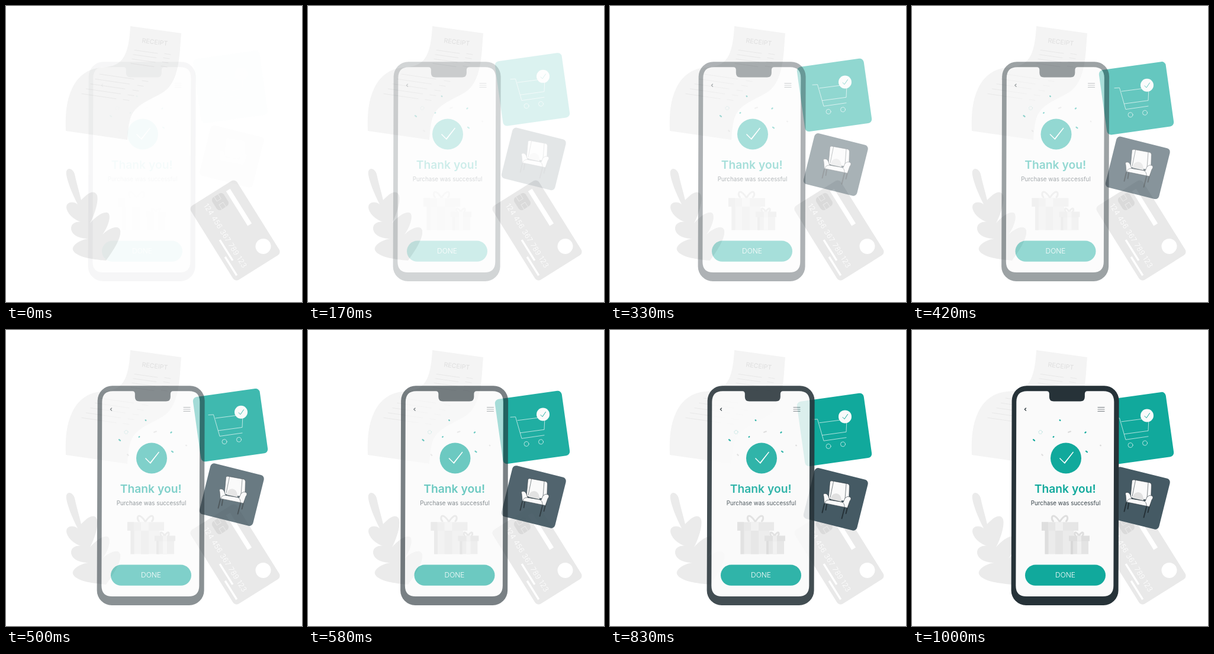
An HTML page for the animation above (1040 ms loop, 500 by 500 pixels).

```html
<!DOCTYPE html>
<html lang="en">
<head>
<meta charset="utf-8">
<title>Purchase complete</title>
<style>
  html, body { margin: 0; width: 100%; height: 100%; overflow: hidden; background: #fff; }
  svg { display: block; width: 100vw; height: 100vh; font-family: Inter, "Open Sans", sans-serif; }
  .line { fill: none; stroke-linecap: round; stroke-linejoin: round; }
</style>
</head>
<body>
<svg viewBox="0 0 500 500">
  <!-- receipt -->
  <path fill="#f4f4f4" d="M210 34 L296 46 C293 80 294 128 265 146 C240 161 218 166 210 190 C207 200 206 213 205 226
    L101 211 C100 180 102 152 118 128 C130 112 143 106 160 104 C190 102 207 96 210 34Z"/>
  <path id="print" class="line" stroke="#e2e2e2" stroke-width=".7"/>
  <text transform="translate(251 64.5) rotate(6.5)" text-anchor="middle" font-size="10.6" fill="#dedede">RECEIPT</text>

  <!-- leaf -->
  <path fill="#ebebeb" d="M169 430 C182 412 195 392 193 379 C190 368 173 376 163 386 C172 374 178 356 173 350
    C166 345 151 356 142 367 C150 352 158 326 153 318 C147 309 135 319 127 328 C124 315 119 298 116 284
    C112 272 100 272 102 285 C104 298 112 317 121 335 C113 329 102 331 102 340 C103 352 118 364 132 366
    C120 362 109 367 110 377 C112 388 125 393 139 393 C125 395 111 404 113 412 C118 424 145 428 169 430Z"/>

  <!-- bank card -->
  <g transform="translate(387 379) rotate(58)">
    <rect x="-74" y="-46" width="148" height="92" rx="7" fill="#e9e9e9"/>
    <rect x="-67" y="-16" width="25" height="23" rx="6" fill="#dadada"/>
    <path class="line" stroke="#e9e9e9" d="M-67 -8H-58V0H-67M-42 -8H-51V0H-42"/>
    <path stroke="#fff" stroke-width="8" d="M-64 -26H5"/>
    <path stroke="#fff" stroke-width="3.4" d="M0 30.5H41M29 38H66"/>
    <circle cx="48" cy="-26" r="13" fill="#fff"/>
    <text x="-64" y="23" font-size="12.2" font-weight="300" letter-spacing=".4" fill="#fff">124 456 367 789 123</text>
  </g>

  <g id="cards">
    <rect x="-57" y="-55.2" width="114" height="110.4" rx="7" fill="#11a99c" transform="translate(379 166.5) rotate(-8)"/>
    <g class="line" stroke="#e4f5f3" stroke-width=".75">
      <path d="M342 149.300 L350.500 148.800 L361 185.300 L399 179.800M354 154.800 L400 148.800 L399 170.300 L358.500 175.800"/>
      <circle cx="369" cy="194.500" r="4"/><circle cx="393.500" cy="191" r="4"/>
    </g>
    <circle cx="397" cy="144.500" r="11" fill="#fafafa"/>
    <path class="line" stroke="#11a99c" d="M393 145.500 L396 148.500 L401.500 140.500"/>

    <rect x="-46.600" y="-44.200" width="93.200" height="88.400" rx="6.500" fill="#455a64" transform="translate(381.300 284) rotate(14)"/>
    <g stroke="#263238" stroke-width=".6" stroke-linejoin="round">
      <path class="line" stroke-width="2" d="M362 292 L358.500 306.500M366 293 L364.500 302M396 299 L391.500 316.500M402 294 L398.500 308"/>
      <path fill="#fafafa" d="M371.500 255 Q372 252.500 375 253 L402 258 Q404.500 259 404.500 262 L403.500 288 L369 283Z"/>
      <path class="line" d="M377.500 254 L372 281M399 258 L397 284"/>
      <path fill="#fafafa" d="M361 279 Q359 274 364 274.500 Q368 275 369.500 281 L371 285 L394 289 L397 282 Q401 278 405 280
        Q409 282 405 287 L401 298.500 L362 290.500Z"/>
      <path class="line" d="M363 290 Q364 285 371 285 L390 288 Q397 290 396 298"/>
    </g>
    <path fill="#e0e0e0" d="M373 284 Q374 274 382 274 Q391 275 391 288Z"/>
  </g>

  <g id="phone">
    <g transform="translate(.7) skewX(-.18)">
      <rect x="168.300" y="94.200" width="181" height="370.700" rx="25" fill="#263238"/>
      <path fill="#fafafa" d="M194 103.300 H227 Q231.500 103.300 231.500 108 V113 Q231.500 120.500 239 120.500 H284
        Q291.500 120.500 291.500 113 V108 Q291.500 103.300 296 103.300 H323 Q341 103.300 341 121.500
        V432 Q341 450 323 450 H194 Q176 450 176 432 V121.500 Q176 103.300 194 103.300Z"/>
    </g>
    <path class="line" stroke="#263238" stroke-width="1.300" d="M192.500 132 L190.300 134 L192.500 136"/>
    <path class="line" stroke="#8a9094" stroke-width="1.200" d="M314 130.600H325M314 134H325M314 137.400H325"/>
    <g id="confetti"></g>

    <circle cx="260" cy="216.500" r="26" fill="#11a99c"/>
    <path fill="#fff" d="M249 217 L250 216 L257.500 223.500 L272 205.500 L273 206.500 L258 226Z"/>

    <g text-anchor="middle">
      <text x="258.700" y="275" font-size="19.300" font-weight="600" fill="#11a99c">Thank you!</text>
      <text x="259.500" y="295.500" font-size="9.800" fill="#37434a">Purchase was successful</text>
      <rect x="191" y="396.600" width="136" height="35.200" rx="17.600" fill="#11a99c"/>
      <text x="259" y="418.300" font-size="12" font-weight="300" fill="#fff">DONE</text>
    </g>

    <g id="gifts"></g>
  </g>
</svg>
<script>
  const LOOP = 1040, FPS = 24, LEAD = .8, SLIDE = 30;
  const $ = id => document.getElementById(id);

  // Receipt rows: a long entry and a short amount
  let rows = "";
  for (let i = 0; i < 4; i++)
    rows += `M${217 - i * 2} ${74.5 + i * 7.5}l39 5.5M${268 - i * 2} ${80.5 + i * 7}l10 1.5`;
  for (let i = 0; i < 5; i++)
    rows += `M${158 - i * 7.5} ${115 + i * 8.3}l58 8.5M${230 - i * 8} ${126 + i * 8}l10 1.5`;
  $("print").setAttribute("d", rows);

  // Confetti: x, y, length, angle, colour
  $("confetti").innerHTML = [
    [206, 186, 4.5, 40, "#11a99c"], [250, 152.5, 3, 50, "#11a99c"], [293, 173, 3.5, -40, "#11a99c"],
    [295, 205.5, 4.5, 35, "#11a99c"], [239, 180.5, 3, -45, "#11a99c"], [266, 172, 6, -20, "#dadada"],
    [318.5, 195, 3, 35, "#dadada"], [220, 211, 4, 45, "#e0e0e0"]
  ].map(([x, y, n, a, c]) =>
    `<rect x="${-n / 2}" y="-1.1" width="${n}" height="2.2" rx=".8" fill="${c}" transform="translate(${x} ${y}) rotate(${a})"/>`
  ).join("") + `<circle cx="217" cy="172.5" r="3" fill="none" stroke="#83d0c9" stroke-dasharray="1 1.4"/>`;

  const box = (x, y, w, h, c) => `<rect x="${x}" y="${y}" width="${w}" height="${h}" fill="${c}"/>`;
  const bow = (x, y, s) => `<path class="line" stroke="#dedede" stroke-width="${3 / s}" transform="translate(${x} ${y}) scale(${s})"
    d="M0 0C-5 -8 -11 -13 -13 -8Q-14 -4 -11 -1M0 0C5 -8 11 -13 13 -8Q14 -4 11 -1"/>`;
  $("gifts").innerHTML =
    bow(249.5, 324, 1) +
    box(224.5, 338, 49, 40.5, "#ebebeb") + box(224.5, 338, 6, 40.5, "#dedede") +
    box(242, 338, 13, 40.5, "#e4e4e4") + box(219, 324.5, 62, 14.5, "#e6e6e6") +
    box(219, 324.5, 11, 14.5, "#dedede") + box(242, 324.5, 13, 14.5, "#f0f0f0") +
    bow(282, 347.5, .55) +
    box(268, 356, 30, 22.5, "#e4e4e4") + box(268, 356, 4, 22.5, "#d8d8d8") +
    box(279, 356, 7, 22.5, "#f0f0f0") + box(265, 347.5, 35, 9, "#dedede") + box(279, 347.5, 7, 9, "#ececec");

  // cubic-bezier(.36, -.01, .5, 1.38), solved by bisection
  const curve = (s, a, b) => 3 * (1 - s) ** 2 * s * a + 3 * (1 - s) * s * s * b + s ** 3;
  function ease(x) {
    let lo = 0, hi = 1;
    for (let i = 0; i < 30; i++) {
      const mid = (lo + hi) / 2;
      if (curve(mid, .36, .5) < x) lo = mid; else hi = mid;
    }
    return curve(hi, -.01, 1.38);
  }

  function place(id, p, axis) {
    const shift = SLIDE * (p - 1);
    $(id).setAttribute("transform", axis === "x" ? `translate(${shift} 0)` : `translate(0 ${shift})`);
    $(id).setAttribute("opacity", Math.max(0, Math.min(1, p)));
  }

  const start = performance.now();
  function draw() {
    const t = (performance.now() - start) % LOOP;
    const step = Math.floor((t + 4.9) * FPS / 1000);
    const p = Math.min(1, (step + LEAD) / FPS);
    place("phone", p, "x");
    place("cards", ease(p), "y");
    requestAnimationFrame(draw);
  }
  draw();
</script>
</body>
</html>
```
